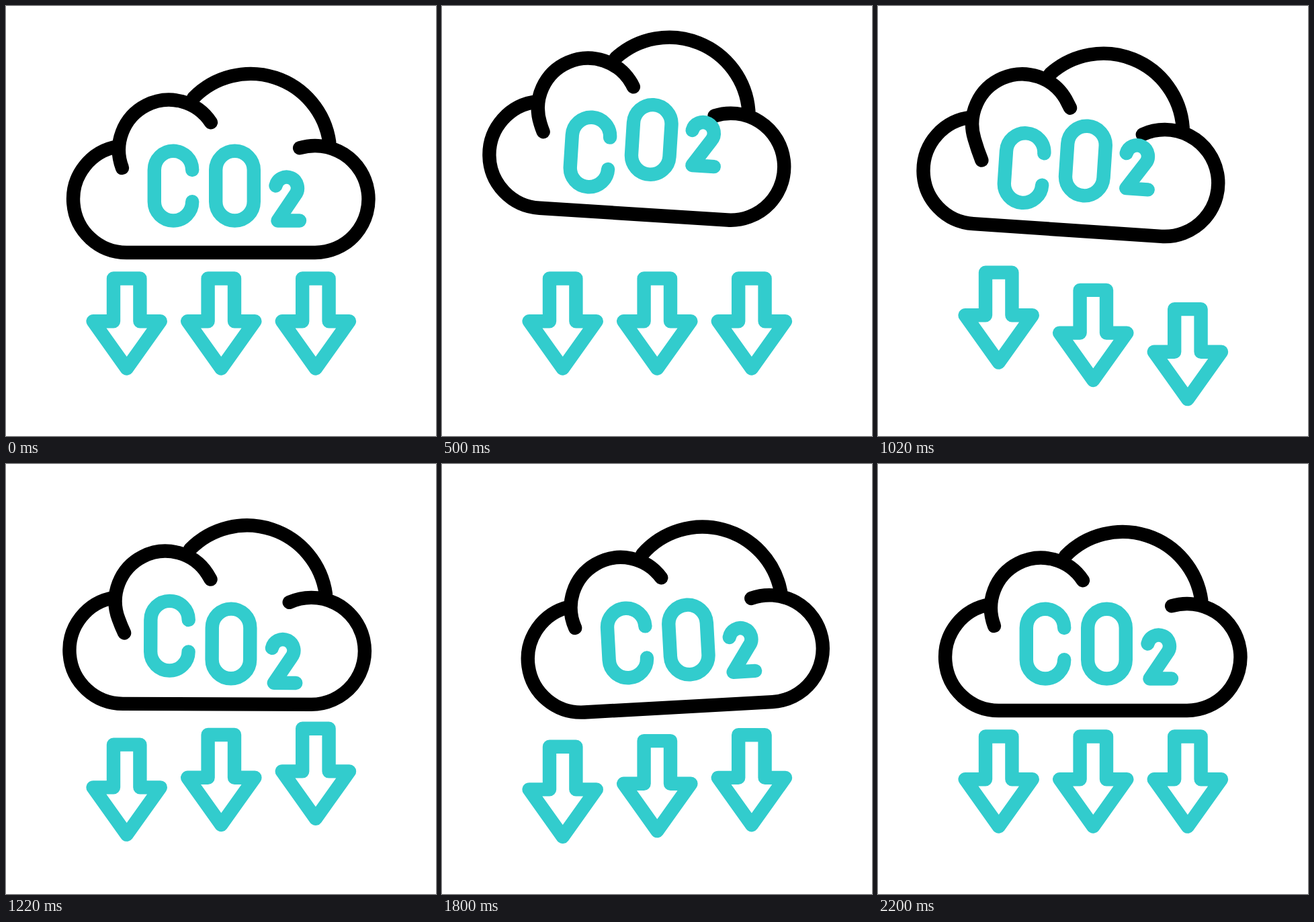
Recreate the animation shown at these times as an HTML page. Size 640 by 640 pixels, loop 2400 ms.

```html
<!DOCTYPE html>
<html lang="en">
<head>
<meta charset="utf-8">
<title>CO2 cloud</title>
<style>
  html, body { margin: 0; width: 100%; height: 100%; overflow: hidden; background: #fff; }
  svg { display: block; width: 100vw; height: 100vh; }
  path, rect { fill: none; stroke-width: 20.4; stroke-linecap: round; stroke-linejoin: round; }
  #cloud { stroke: #000; }
  .teal { stroke: #32cccd; }
</style>
</head>
<body>
<svg viewBox="0 0 640 640">
  <g class="teal">
    <path class="arrow"/>
    <path class="arrow"/>
    <path class="arrow"/>
  </g>
  <g id="cloud">
    <path id="body"/>
    <path id="puff"/>
    <path d="M279 136.8A118.5 118.5 0 0 1 481.3 203"/>
  </g>
  <g class="teal">
    <path class="letter" d="M277.2 244A28.2 28.2 0 0 0 220.8 244V291.3A28.2 28.2 0 0 0 277.2 291.3"/>
    <rect class="letter" x="312.2" y="215.8" width="56.6" height="103.7" rx="28.3"/>
    <path class="letter" d="M401.5 267.5A16.4 16.4 0 1 1 430.5 281L404.5 319.5H437"/>
  </g>
</svg>
<script>
const LOOP = 2400, REST = 2200, STAGGER = 66.7;

// Eases with a half cosine between [time, value] keys.
function ease(keys, t) {
  const i = keys.findIndex(k => t < k[0]);
  if (i < 0) return keys[keys.length - 1][1];
  if (i === 0) return keys[0][1];
  const [t0, a] = keys[i - 1], [t1, b] = keys[i];
  return a + (b - a) * (1 - Math.cos(Math.PI * (t - t0) / (t1 - t0))) / 2;
}

// Three shrinking bounces: out to size, back to the rebound, then settle at end.
function bounce({ start, crest, period, fall, size, back, decay, end }) {
  const keys = [[start, 0]];
  for (let k = 0; k < 3; k++) {
    const t = crest + k * period, f = decay ** k;
    keys.push([t, size * f], k < 2 ? [t + fall, back * f] : [end, 0]);
  }
  return t => ease(keys, t);
}

// One swing to each side.
const swing = (t1, a, t2, b) => t => ease([[0, 0], [t1, a], [t2, b], [REST, 0]], t);

const sway = swing(817, -44.5, 1633, 34.5);
const tilt = swing(817, 5.4, 1590, -4.3);
const lift = bounce({ start: 0, crest: 425, period: 478, fall: 300,
                      size: -65, back: -13, decay: .7, end: 1950 });
const hop = bounce({ start: 60, crest: 345, period: 505, fall: 220,
                     size: -32, back: 22, decay: .73, end: 1575 });
const drop = bounce({ start: 508, crest: 845, period: 520, fall: 210,
                      size: 52, back: -13, decay: .62, end: 2075 });
const grow = t => ease([[300, 0], [800, 1.07], [1740, 0]], t);

const $ = s => document.querySelector(s);
const all = s => [...document.querySelectorAll(s)];
const cloud = $('#cloud'), body = $('#body'), puff = $('#puff');
const arrows = all('.arrow'), letters = all('.letter');

arrows.forEach((a, i) => {
  const x = 179.7 + 140.6 * i;
  a.setAttribute('d', `M${x - 19.7} 405.5h39.4v63.7h30.4l-50.1 70.3l-50.1 -70.3h30.4z`);
});

// Line ends of the cloud lengthen by g, from 0 to about 1.
function shape(g) {
  const a = (253.3 - 12.5 * g) * Math.PI / 180;
  const x = 460 + 79.5 * Math.cos(a), y = 287.5 + 79.5 * Math.sin(a);
  body.setAttribute('d',
    `M${x} ${y}A79.5 79.5 0 1 1 460 367H180A79.5 79.5 0 0 1 167 209`);
  const s = 36 * g, e = 15 * g;
  puff.setAttribute('d',
    `M${173 + .385 * s} ${241 + .92 * s}Q${173 + .17 * s} ${241 + .47 * s} 173 241` +
    `A74.6 74.6 0 0 1 305 173.3l${.51 * e} ${.86 * e}`);
}

function draw(t) {
  const x = sway(t), y = lift(t), r = tilt(t);
  const pose = dy => `translate(${x} ${y + dy}) rotate(${r} 320 288)`;
  cloud.setAttribute('transform', pose(0));
  shape(grow(t));
  letters.forEach((l, i) => l.setAttribute('transform', pose(hop(t - i * STAGGER))));
  arrows.forEach((a, i) =>
    a.setAttribute('transform', `translate(0 ${drop(t - i * STAGGER)})`));
}

const start = performance.now();
function tick() {
  draw((performance.now() - start) % LOOP);
  requestAnimationFrame(tick);
}
draw(0);
requestAnimationFrame(tick);
</script>
</body>
</html>
```
